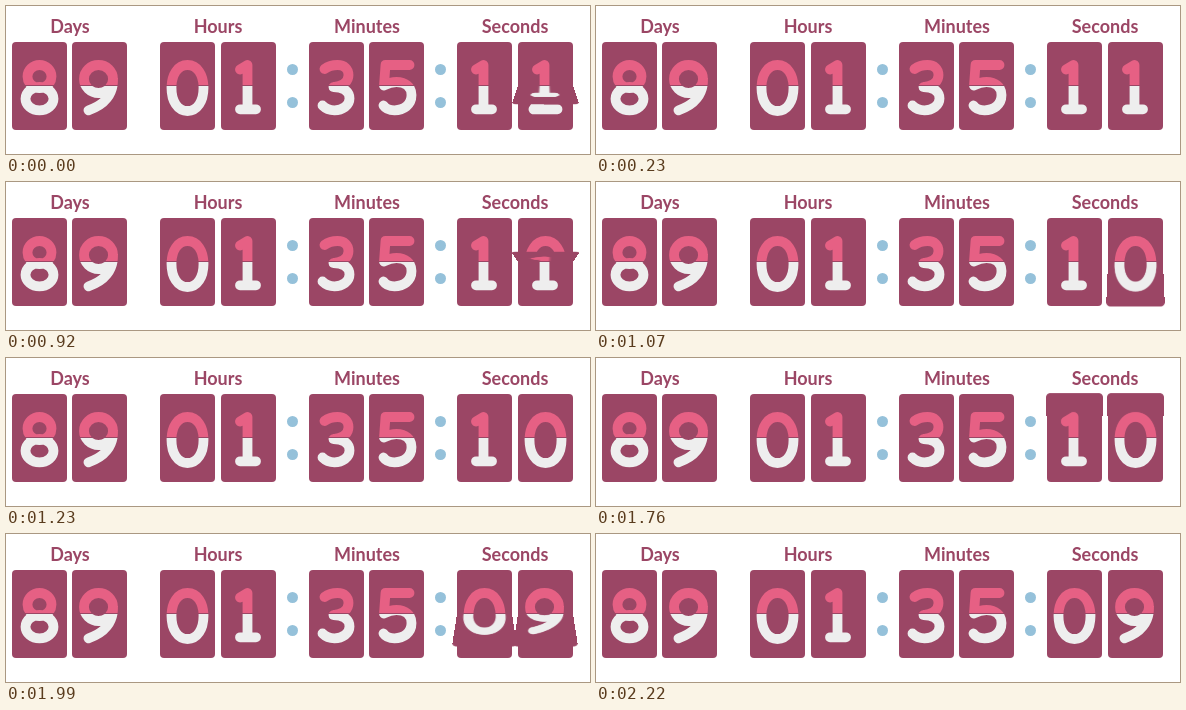
Animation of 584x148 px, one loop 2.54 s. Source, as an HTML page with a canvas:

```html
<!DOCTYPE html>
<html lang="en">
<head>
<meta charset="utf-8">
<title>Countdown</title>
<style>
  html, body { margin: 0; width: 100%; height: 100%; overflow: hidden; background: #fff; }
  canvas { display: block; width: 584px; height: 148px; }
</style>
</head>
<body>
<canvas id="stage" width="584" height="148"></canvas>
<script>
const ctx = document.getElementById('stage').getContext('2d');
ctx.imageSmoothingQuality = 'high';

const LOOP = 2540, TICK = 76.8, TICK_LEAD = 9;
const FLIP = 500, DEPTH = 220;
const CARD_W = 55, HALF = 44, MID = 80, DETAIL = 4;
const PLUM = '#9b4665', PINK = '#e66084', PALE = '#eeeeee', BLUE = '#95c1da';

const FLIPS = [
  { start: -282, from: '12', to: '11' },
  { start: 689, from: '11', to: '10' },
  { start: 1682, from: '10', to: '09' }
];
const GROUPS = [
  { label: 'Days', center: 64, cards: [6, 66], value: '89' },
  { label: 'Hours', center: 212, cards: [154, 215], value: '01' },
  { label: 'Minutes', center: 361, cards: [303, 363], value: '35' },
  { label: 'Seconds', center: 509, cards: [451, 512] }
];

// Pen strokes around the middle of a card
const DIGITS = {
  0: 'M0-21C10-21 16-11 16 2S10 25 0 25S-16 15-16 2S-10-21 0-21Z',
  1: 'M-8.5-16.5L-1-21V23.3M-8.5 23.3H7.5',
  2: 'M-12-13C-10-24 12-25 12-9C12 4-6 12-12 23.3H12',
  3: 'M-12-17C-8-20-3-21 1-21C8-21 12-17 12-11C12-4 6 0-3 1C8 1 13 6 13 12.5C13 19.5 6 24.3-2 24.3C-8 24.3-11 22.5-14 19.5',
  5: 'M13-21H-11L-12.5-.5C-8-3-4-4 0-4C9-4 15 1 15 9C15 19 7 24.3-2 24.3C-7 24.3-11 22.5-13 19.5',
  8: 'M0-21A12 11.5 0 0 1 0 2A12 11.5 0 0 1 0-21ZM0 1A14 11.7 0 0 1 0 24.4A14 11.7 0 0 1 0 1Z',
  9: 'M13.5-7A14.5 14 0 1 1-15.5-7A14.5 14 0 1 1 13.5-7C14 8 5 19-11 24.3'
};
const paths = {};
for (const d in DIGITS) paths[d] = new Path2D(DIGITS[d]);

function drawHalf(g, digit, top) {
  g.save();
  g.beginPath();
  g.roundRect(0, top ? -HALF : 0, CARD_W, HALF, top ? [4, 4, 0, 0] : [0, 0, 4, 4]);
  g.fillStyle = PLUM;
  g.fill();
  g.clip();
  g.translate(CARD_W / 2, 0);
  g.lineWidth = 9.8;
  g.lineCap = g.lineJoin = 'round';
  g.strokeStyle = top ? PINK : PALE;
  g.stroke(paths[digit]);
  g.restore();
}

const faces = {};
function getFace(digit, top) {
  const key = digit + top;
  if (!faces[key]) {
    const face = document.createElement('canvas');
    face.width = CARD_W * DETAIL;
    face.height = HALF * DETAIL;
    const g = face.getContext('2d');
    g.scale(DETAIL, DETAIL);
    g.translate(0, top ? HALF : 0);
    drawHalf(g, digit, top);
    faces[key] = face;
  }
  return faces[key];
}

// Projects a hinged half card row by row
function drawLeaf(x, digit, top, angle) {
  const face = getFace(digit, top);
  const c = Math.abs(Math.cos(angle)), s = Math.sin(angle);
  const height = HALF * c * DEPTH / (DEPTH - HALF * s);
  const unproject = y => y * DEPTH / (c * DEPTH + y * s);
  for (let i = 0; i < height; i++) {
    const rowH = Math.min(1, height - i);
    const near = unproject(i), far = Math.min(HALF, unproject(i + rowH));
    const width = CARD_W * DEPTH / (DEPTH - (near + far) / 2 * s);
    ctx.drawImage(face,
      0, (top ? HALF - far : near) * DETAIL, face.width, (far - near) * DETAIL,
      x + (CARD_W - width) / 2, top ? MID - i - rowH : MID + i, width, rowH);
  }
}

function drawCard(x, from, to, progress) {
  ctx.save();
  ctx.translate(x, MID);
  drawHalf(ctx, to, true);
  drawHalf(ctx, progress < 1 ? from : to, false);
  ctx.restore();
  if (from !== to && progress < 1) {
    const top = progress < 0.5;
    drawLeaf(x, top ? from : to, top, progress * Math.PI);
  }
  ctx.fillStyle = PLUM;
  ctx.fillRect(x, MID - 1, CARD_W, 1);
}

// cubic-bezier(.42, 0, .58, 1)
function easeInOut(x) {
  if (x <= 0) return 0;
  if (x >= 1) return 1;
  let lo = 0, hi = 1;
  for (let i = 0; i < 24; i++) {
    const u = (lo + hi) / 2, v = 1 - u;
    if (1.26 * u * v * v + 1.74 * u * u * v + u * u * u < x) lo = u;
    else hi = u;
  }
  return lo * lo * (3 - 2 * lo);
}

function draw(ms) {
  const time = Math.floor((ms % LOOP + TICK_LEAD) / TICK) * TICK;
  const flip = FLIPS.filter(f => f.start <= time).pop();
  const progress = easeInOut((time - flip.start) / FLIP);

  ctx.fillStyle = '#fff';
  ctx.fillRect(0, 0, 584, 148);
  ctx.font = 'bold 18px Lato, sans-serif';
  ctx.textAlign = 'center';
  for (const { label, center, cards, value } of GROUPS) {
    ctx.fillStyle = PLUM;
    ctx.fillText(label, center, 27);
    const from = value || flip.from, to = value || flip.to;
    cards.forEach((x, i) => drawCard(x, from[i], to[i], progress));
  }
  ctx.fillStyle = BLUE;
  for (const x of [286.5, 434.5]) {
    for (const y of [63.5, 96.5]) {
      ctx.beginPath();
      ctx.arc(x, y, 5.5, 0, Math.PI * 2);
      ctx.fill();
    }
  }
}

let origin;
function tick(now) {
  origin ??= now;
  draw(Math.max(0, now - origin));
  requestAnimationFrame(tick);
}
draw(0);
requestAnimationFrame(tick);
</script>
</body>
</html>
```
